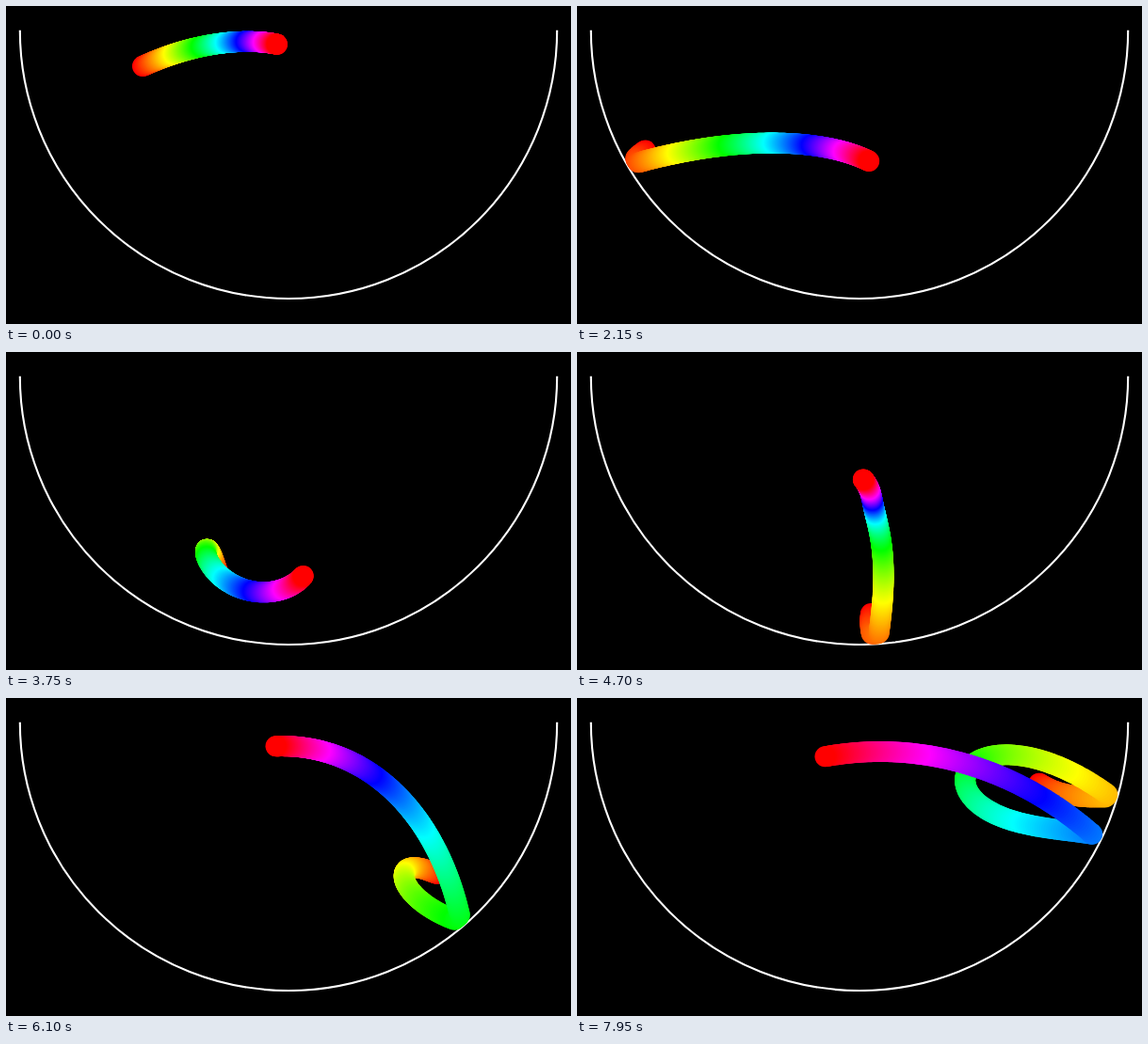
Write an HTML page that moves like this. It is 600x338 px and loops after 8 s.

```html
<!DOCTYPE html>
<html lang="en">
<head>
<meta charset="utf-8">
<title>Bouncing balls</title>
<style>
  html, body { margin: 0; width: 100%; height: 100%; overflow: hidden; background: #000; }
  svg { display: block; width: 600px; height: 338px; }
</style>
</head>
<body>
<svg id="stage" viewBox="0 0 600 338">
  <path d="M14.8 25.8A285.2 285.2 0 0 0 585.2 25.8" fill="none" stroke="#fff" stroke-width="2.1"/>
  <g id="balls"></g>
</svg>
<script>
const LOOP = 8, STEP = 0.05, COUNT = 360;
const CX = 300, CY = 26, REACH = 274, RADIUS = 11;
const G = 40.7, TOP = 37;   // gravity in px/s², height at which a ball would rest
const HOLD = 0.065;         // contact time at the wall, in s

const quad = (a, b, c) => u => a + b * u + c * u * u;
const startX = quad(145, 210, -67);
const startVx = quad(-46.5, 83, -26.2);
const startVy = quad(6.5, -10.3, 17.8);

const fly = (s, dt) => ({
  t: s.t + dt,
  x: s.x + s.vx * dt,
  y: s.y + s.vy * dt + G * dt * dt / 2,
  vx: s.vx,
  vy: s.vy + G * dt
});
const outside = s => Math.hypot(s.x - CX, s.y - CY) > REACH;

function bounce(s) {
  const d = Math.hypot(s.x - CX, s.y - CY);
  const nx = (s.x - CX) / d, ny = (s.y - CY) / d;
  const k = 2 * (s.vx * nx + s.vy * ny);
  return { ...s, t: s.t + HOLD, hit: s.t, vx: s.vx - k * nx, vy: s.vy - k * ny };
}

// Each ball's path is a list of free flights, one per bounce.
function flights(u) {
  const vx = startVx(u), vy = startVy(u);
  let s = { t: 0, hit: 0, x: startX(u), y: TOP + (vx * vx + vy * vy) / (2 * G), vx, vy };
  const list = [s];
  for (let dt = 0.02; s.t + dt < LOOP; dt += 0.02) {
    if (!outside(fly(s, dt))) continue;
    let lo = dt - 0.02, hi = dt;
    for (let i = 0; i < 24; i++) {
      const mid = (lo + hi) / 2;
      if (outside(fly(s, mid))) hi = mid; else lo = mid;
    }
    s = bounce(fly(s, lo));
    list.push(s);
    dt = 0;
  }
  return list;
}

const group = document.getElementById("balls");
const balls = Array.from({ length: COUNT }, (_, i) => {
  const u = i / (COUNT - 1);
  const dot = document.createElementNS("http://www.w3.org/2000/svg", "circle");
  dot.setAttribute("r", RADIUS);
  dot.setAttribute("fill", `hsl(${360 * u} 100% 50%)`);
  group.appendChild(dot);
  return { dot, path: flights(u) };
});

function draw(t) {
  for (const { dot, path } of balls) {
    let i = path.length - 1;
    while (i > 0 && path[i].hit > t) i--;
    const p = fly(path[i], Math.max(0, t - path[i].t));
    dot.setAttribute("cx", p.x.toFixed(2));
    dot.setAttribute("cy", p.y.toFixed(2));
  }
}

const begin = performance.now();
function tick() {
  const t = (performance.now() - begin) / 1000 % LOOP;
  draw(Math.floor(t / STEP + 1e-6) * STEP);
  requestAnimationFrame(tick);
}
tick();
</script>
</body>
</html>
```
